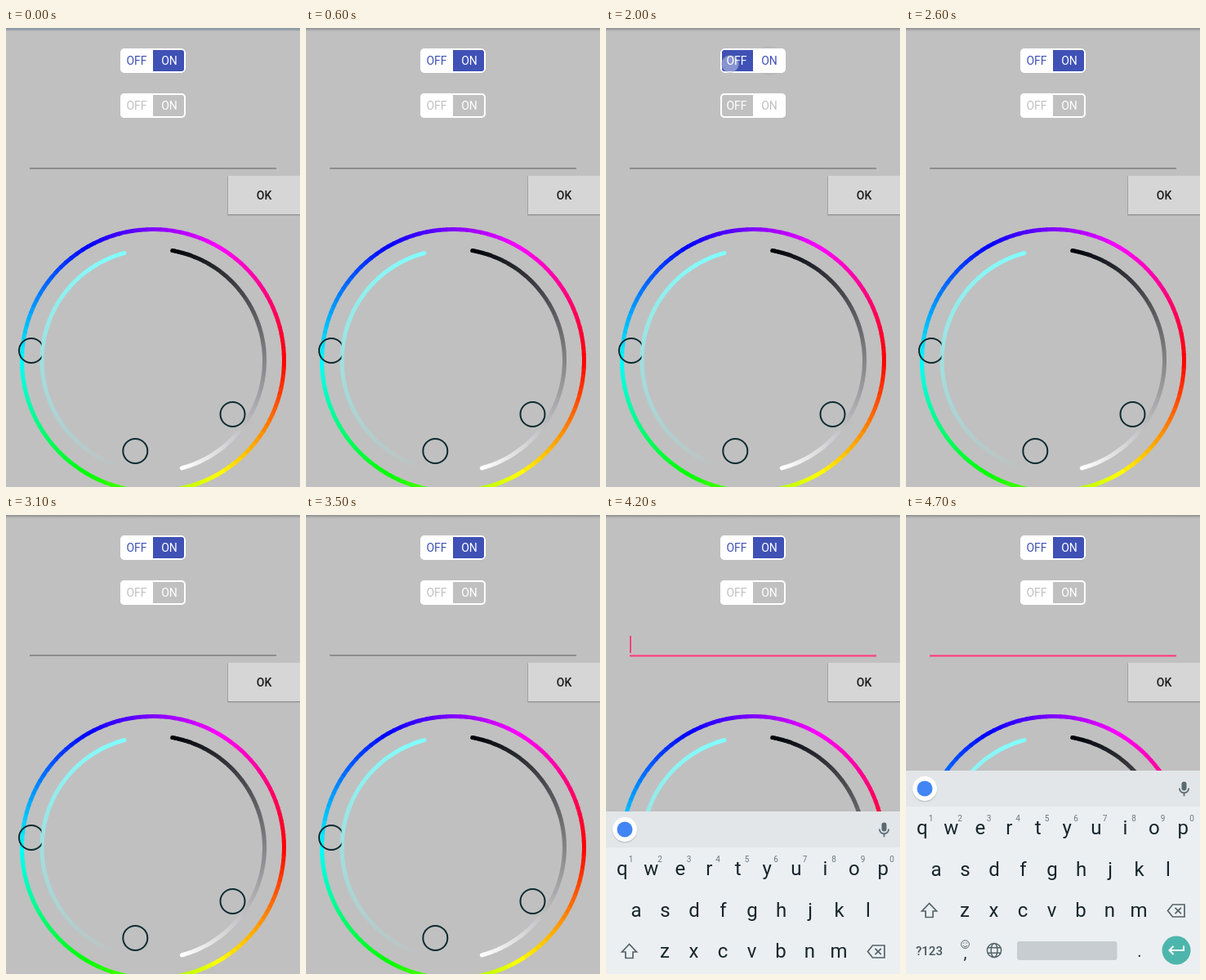
Animation, 360 px wide and 562 px high, one loop 5.1 s. Source, as an HTML page:

```html
<!DOCTYPE html>
<html lang="en">
<head>
<meta charset="utf-8">
<title>Toggle and input demo</title>
<style>
  html, body { margin: 0; width: 100%; height: 100%; overflow: hidden; background: #c0c0c0; }
  svg { display: block; width: 360px; height: 562px; }
  text { font-family: Roboto, "Noto Sans", sans-serif; text-anchor: middle; }
</style>
</head>
<body>
<svg id="stage" viewBox="0 0 360 562">
  <defs>
    <linearGradient id="shade" x1="0" y1="0" x2="0" y2="1">
      <stop offset="0" stop-color="#8c8c8c"/>
      <stop offset="1" stop-color="#c0c0c0"/>
    </linearGradient>
    <clipPath id="handleClip"><rect x="0" y="370" width="43.5" height="50"/></clipPath>
  </defs>
  <rect width="360" height="562" fill="#c0c0c0"/>
  <rect width="360" height="4" fill="url(#shade)"/>
  <rect id="tint" width="360" height="3" fill="#7f9db0" opacity=".45"/>
  <circle id="ripple" cy="40" fill="#000" opacity="0"/>
  <g id="toggles"></g>
  <rect id="line" x="29" width="302"/>
  <rect id="cursor" x="29" y="148" width="2" height="21" fill="#ff4081"/>
  <g id="button">
    <rect x="271" y="182" width="90" height="48" fill="#000" opacity=".09"/>
    <rect x="271.5" y="181" width="90" height="48.2" fill="#000" opacity=".14"/>
    <rect x="272" y="181" width="88" height="47" fill="#d6d6d6"/>
    <text x="316" y="210" font-size="14" font-weight="500" fill="#1c1c1c">OK</text>
  </g>
  <g id="rings" fill="none"></g>
  <g fill="none" stroke="#0b2a30" stroke-width="2">
    <circle cx="31" cy="395" r="15" clip-path="url(#handleClip)"/>
    <circle cx="277.5" cy="473" r="15"/>
    <circle cx="158.3" cy="518" r="15"/>
  </g>
  <circle id="dot" r="10.5" fill="#fff" stroke="#76767e" stroke-opacity=".35"/>
  <g id="keyboard">
    <rect width="360" height="250" fill="#eceff1"/>
    <rect width="360" height="44" fill="#e2e6e9"/>
    <circle cx="23" cy="23" r="15.4" fill="#000" opacity=".12"/>
    <circle cx="23" cy="22" r="15" fill="#fff"/>
    <circle cx="23" cy="22" r="9.5" fill="#4285f4"/>
    <g id="mic" fill="none" stroke="#5a6a72" stroke-width="1.7">
      <rect x="337.5" y="13.5" width="6" height="11" rx="3" fill="#5a6a72" stroke="none"/>
      <path d="M334.8 21.5a5.7 5.7 0 0 0 11.4 0M340.5 27.2v4"/>
    </g>
    <g id="keys" fill="#16252c"></g>
    <g fill="none" stroke="#53636b" stroke-width="1.7">
      <path d="M28.5 162.5l-9 9.5h4.5v7.5h9v-7.5h4.5z"/>
      <path d="M320.5 171.5l6-7.5h14.5v15h-14.5zM329.5 167.8l7.4 7.4M336.9 167.8l-7.4 7.4"/>
      <g stroke-width="1.5">
        <circle cx="108" cy="220" r="8.6"/>
        <ellipse cx="108" cy="220" rx="3.9" ry="8.6"/>
        <path d="M100.3 216.8h15.4M100.3 223.2h15.4"/>
      </g>
      <g stroke-width="1">
        <circle cx="72.5" cy="212.7" r="4.9"/>
        <path d="M70 214a2.7 2.7 0 0 0 5 0M70.8 210.4v1.4M74.2 210.4v1.4"/>
      </g>
    </g>
    <rect x="136" y="209" width="122.5" height="23" rx="3" fill="#c7cdd1"/>
    <circle cx="331" cy="220" r="17.5" fill="#4db6ac"/>
    <path d="M340 214.5v5.5h-17.5m5-5l-5 5l5 5" fill="none" stroke="#fff" stroke-width="2"/>
  </g>
</svg>
<script>
const LOOP = 5100, STEP = 100;
const BLUE = '#3f51b5', PINK = '#ff4081', GREY = '#c0c0c0';
const $ = id => document.getElementById(id);

function add(parent, tag, attrs, text) {
  const el = document.createElementNS('http://www.w3.org/2000/svg', tag);
  set(el, attrs);
  if (text) el.textContent = text;
  return parent.appendChild(el);
}

function set(el, attrs) {
  for (const k in attrs) el.setAttribute(k, attrs[k]);
}

// Arc around the dial centre, drawn as short segments of changing colour.
function dial(radius, from, to, width, color, caps) {
  const n = 120;
  const point = deg => {
    const a = deg * Math.PI / 180;
    return `${(180 + radius * Math.cos(a)).toFixed(2)} ${(407 + radius * Math.sin(a)).toFixed(2)}`;
  };
  for (let i = 0; i < n; i++) {
    const a = from + (to - from) * i / n;
    const b = from + (to - from) * Math.min(n, i + 1.2) / n;
    add($('rings'), 'path', {
      d: `M${point(a)}A${radius} ${radius} 0 0 ${to > from ? 1 : 0} ${point(b)}`,
      stroke: color((i + .5) / n),
      'stroke-width': width,
      'stroke-linecap': caps && (i === 0 || i === n - 1) ? 'round' : 'butt'
    });
  }
}

const mix = (a, b, p) => `rgb(${a.map((v, i) => Math.round(v + (b[i] - v) * p))})`;

dial(160.5, 0, 360, 5, p => `hsl(${p * 360} 100% 50%)`, false);
dial(136, 255, 105, 5, p => mix([128, 255, 255], [192, 192, 192], p), true);
dial(136.5, -80, 75, 5, p => mix([0, 0, 8], [255, 255, 255], p), true);

function makeToggle(y, color) {
  const g = add($('toggles'), 'g', { transform: `translate(140 ${y})` });
  const clip = add(g, 'clipPath', { id: 'clip' + y });
  const box = { width: 80, height: 30, rx: 5 };
  add(clip, 'rect', box);
  add(g, 'rect', { ...box, fill: color });
  const thumb = add(g, 'rect', { y: 0, width: 40, height: 30, fill: '#fff', 'clip-path': `url(#clip${y})` });
  add(g, 'rect', { x: 1, y: 1, width: 78, height: 28, rx: 4, fill: 'none', stroke: '#fff', 'stroke-width': 2 });
  const label = (x, s) => add(g, 'text', { x, y: 20.4, 'font-size': 14 }, s);
  const off = label(20, 'OFF'), on = label(60, 'ON');
  return (x, isOn) => {
    set(thumb, { x });
    set(off, { fill: isOn ? '#fff' : color });
    set(on, { fill: isOn ? color : '#fff' });
  };
}
const toggles = [makeToggle(25, BLUE), makeToggle(80, GREY)];

function keyRow(letters, x0, y) {
  [...letters].forEach((c, i) =>
    add($('keys'), 'text', { x: x0 + 35.5 * i, y, 'font-size': 24 }, c));
}
keyRow('qwertyuiop', 19.8, 78);
keyRow('asdfghjkl', 37, 128.5);
keyRow('zxcvbnm', 72, 179);
[...'1234567890'].forEach((c, i) =>
  add($('keys'), 'text', { x: 30.5 + 35.5 * i, y: 61.5, 'font-size': 10, fill: '#6b7880' }, c));
add($('keys'), 'text', { x: 28.5, y: 225.5, 'font-size': 15, 'font-weight': 500, fill: '#46565e' }, '?123');
add($('keys'), 'text', { x: 72.5, y: 230, 'font-size': 20 }, ',');
add($('keys'), 'text', { x: 286, y: 228, 'font-size': 20 }, '.');

// Each step changes part of the state; the rest carries over.
const start = {
  tint: 1, thumb: 0, on: false, ripple: 0, rippleSize: 25,
  dot: 0, dotX: 152, dotY: 44, pink: false, cursor: 0, kb: 562
};
const steps = [
  [100, { tint: 0 }],
  [1200, { dot: .38, ripple: .04, rippleSize: 18 }],
  [1300, { thumb: 24, on: true, ripple: .05, rippleSize: 25 }],
  [1400, { thumb: 37, dot: 0, ripple: .03 }],
  [1500, { thumb: 40, ripple: .01 }],
  [1600, { ripple: 0 }],
  [2000, { dot: .38, ripple: .04, rippleSize: 18 }],
  [2100, { thumb: 16, on: false, ripple: .05, rippleSize: 25 }],
  [2200, { thumb: 0, dot: 0, ripple: .02 }],
  [2300, { ripple: 0 }],
  [2900, { dot: .38, dotY: 90 }],
  [3100, { dot: 0 }],
  [3200, { dot: .38 }],
  [3400, { dot: 0 }],
  [3900, { dot: .38, dotX: 69.5, dotY: 172, pink: true }],
  [4000, { cursor: 1 }],
  [4200, { dot: 0, kb: 363 }],
  [4300, { kb: 322 }],
  [4400, { kb: 313 }],
  [4500, { cursor: 0 }]
];

function draw(t) {
  const s = { ...start };
  for (const [at, change] of steps) if (at <= t) Object.assign(s, change);
  set($('tint'), { opacity: .45 * s.tint });
  toggles.forEach(move => move(s.thumb, s.on));
  set($('ripple'), { cx: 160 + s.thumb, r: s.rippleSize, opacity: s.ripple });
  set($('dot'), { cx: s.dotX, cy: s.dotY, 'fill-opacity': s.dot, visibility: s.dot ? 'visible' : 'hidden' });
  set($('line'), s.pink ? { y: 171.3, height: 2.2, fill: PINK } : { y: 171, height: 1.7, fill: '#858585' });
  set($('cursor'), { opacity: s.cursor });
  set($('keyboard'), { transform: `translate(0 ${s.kb})` });
}

function tick() {
  const t = performance.now() % LOOP;
  draw(Math.floor(t / STEP) * STEP);
  requestAnimationFrame(tick);
}
tick();
</script>
</body>
</html>
```
